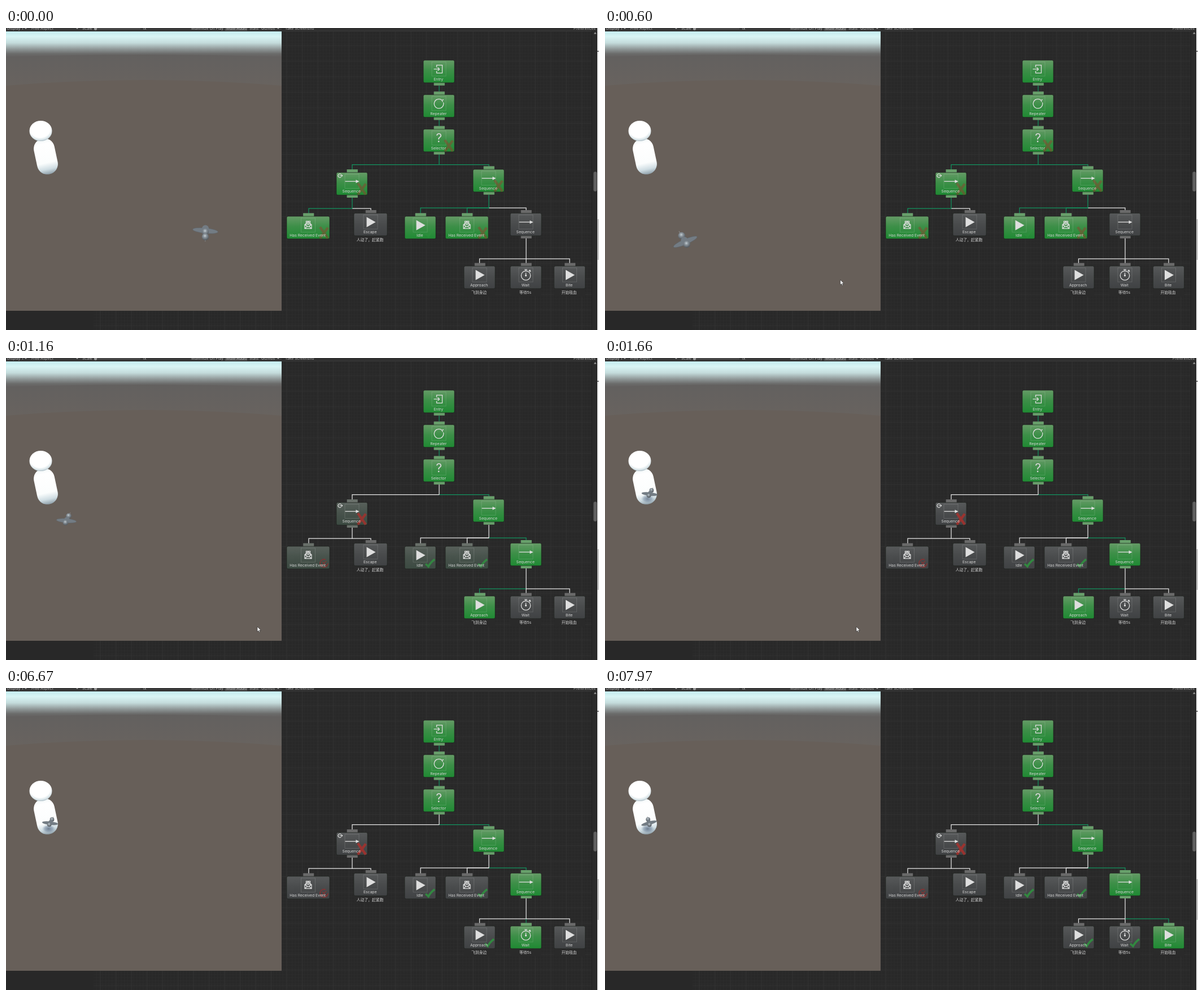
An HTML page that plays this animation: 1050 by 534 pixels, repeating every 8000 ms.

```html
<!DOCTYPE html>
<html lang="en">
<head>
<meta charset="utf-8">
<title>Behavior tree</title>
<style>
html, body { margin: 0; width: 100%; height: 100%; overflow: hidden; background: #282828; }
svg { display: block; width: 100vw; height: 100vh; }
text { font-family: Inter, "Noto Sans CJK SC", "Noto Sans CJK", sans-serif; font-size: 6.8px; fill: #d6d6d6; }
.mid { text-anchor: middle; }
.bar text { fill: #b4b4b4; }
</style>
</head>
<body>
<svg id="stage" viewBox="0 0 1050 534" preserveAspectRatio="none">
  <defs>
    <pattern id="minor" width="5.5" height="5.5" patternUnits="userSpaceOnUse">
      <path d="M0 .5H5.5M.5 0V5.5" stroke="#2d2d2d" stroke-width=".7"/>
    </pattern>
    <pattern id="major" x="2" y="3" width="27.5" height="27.5" patternUnits="userSpaceOnUse">
      <path d="M0 .5H27.5M.5 0V27.5" stroke="#343434" stroke-width=".8"/>
    </pattern>
    <linearGradient id="green" x2="0" y2="1">
      <stop stop-color="#659b66"/><stop offset=".45" stop-color="#3d8f48"/><stop offset="1" stop-color="#1f8a33"/>
    </linearGradient>
    <linearGradient id="gray" x2="0" y2="1">
      <stop stop-color="#57595a"/><stop offset=".5" stop-color="#494b4c"/><stop offset="1" stop-color="#404244"/>
    </linearGradient>
    <linearGradient id="sky" x2="0" y2="1">
      <stop stop-color="#c3ebee"/><stop offset=".2" stop-color="#d9f5f5"/><stop offset=".45" stop-color="#c4dcdc"/>
      <stop offset=".7" stop-color="#8f9797"/><stop offset=".88" stop-color="#6b6b6a"/><stop offset="1" stop-color="#646160"/>
    </linearGradient>
    <linearGradient id="haze" x2="0" y2="1">
      <stop stop-color="#62605f"/><stop offset="1" stop-color="#68635f"/>
    </linearGradient>
    <radialGradient id="head" cx=".47" cy=".36" r=".66">
      <stop offset=".7" stop-color="#fff"/><stop offset=".88" stop-color="#d8e4e8"/><stop offset="1" stop-color="#a3b3bc"/>
    </radialGradient>
    <linearGradient id="torso" x2="0" y2="1">
      <stop stop-color="#eef5f6"/><stop offset=".15" stop-color="#fff"/><stop offset=".68" stop-color="#fbfdfd"/>
      <stop offset=".86" stop-color="#cfdde3"/><stop offset="1" stop-color="#8fa0aa"/>
    </linearGradient>
    <radialGradient id="ball" cx=".45" cy=".35" r=".65">
      <stop stop-color="#c6d0d6"/><stop offset=".35" stop-color="#8d969d"/><stop offset="1" stop-color="#4f555b"/>
    </radialGradient>
    <radialGradient id="shade">
      <stop stop-color="#5d6d82" stop-opacity=".85"/><stop offset=".6" stop-color="#7d90a5" stop-opacity=".6"/><stop offset="1" stop-color="#a0b4c4" stop-opacity="0"/>
    </radialGradient>
    <clipPath id="view"><rect y="6" width="488" height="494"/></clipPath>
  </defs>

  <rect width="1050" height="534" fill="#282828"/>
  <g id="grid"></g>

  <g id="scene" clip-path="url(#view)">
    <rect y="6" width="488" height="494" fill="#675f59"/>
    <path d="M0 40H488V102Q244 82 0 102Z" fill="url(#haze)"/>
    <path d="M0 6H488V51Q244 43 0 51Z" fill="url(#sky)"/>
    <rect x="52" y="195" width="37" height="64" rx="18" fill="url(#torso)" transform="rotate(-12 70.5 227)"/>
    <ellipse cx="61.5" cy="182" rx="20" ry="18" fill="url(#head)"/>
    <ellipse id="shadow" cx="75.5" cy="249" rx="12" ry="8" fill="url(#shade)"/>
    <g id="fly"></g>
  </g>

  <g class="bar" id="bar">
    <rect width="1047" height="6" fill="#383838"/>
    <rect x="488" width="559" height="5" fill="#303030"/>
    <rect y="5.2" width="488" height=".8" fill="#252525"/>
    <rect x="388" width="39" height="5" fill="#525252"/>
    <path d="M161 1.5H238" stroke="#606060"/>
    <circle cx="158.5" cy="1.2" r="2.6" fill="#999"/>
    <path d="M33 0h4l-2 2zM124 0h4l-2 2zM480 0h4l-2 2z" fill="#aaa"/>
  </g>
  <g id="links" fill="none" stroke-width="1.25"></g>
  <g id="nodes"></g>

  <rect x="1038" y="5" width="9" height="529" fill="#2b2b2b"/>
  <path d="M1037.5 5V534" stroke="#242424"/>
  <path d="M1040.8 10.5l2.4-3.2 2.4 3.2z" fill="#999"/>
  <rect x="1040.3" y="254" width="6" height="35" rx="3" fill="#5f5f5f"/>
  <rect x="1047" width="3" height="534" fill="#f0f0f0"/>
  <rect x="1047" y="338" width="3" height="72" fill="#c8c8c8"/>
  <rect x="1047" y="40.5" width="2.5" height="1.5" fill="#444"/>
  <path id="cursor" d="M0 0V9L2.1 7.1 3.6 10.3 5 9.7 3.6 6.6H6.4Z" fill="#fff" stroke="#222" stroke-width=".6"/>
</svg>
<script>
const LOOP = 8000, FADE = 500;
const SEEN = 715, ARRIVED = 1695, BITE = 6690;
const GREEN = '#12935f', WHITE = '#e6e6e6';
const $ = id => document.getElementById(id);
const clamp = v => Math.max(0, Math.min(1, v));
const mix = (a, b, u) => a + (b - a) * u;

function add(parent, tag, attrs = {}, text) {
  const el = document.createElementNS('http://www.w3.org/2000/svg', tag);
  set(el, attrs);
  if (text) el.textContent = text;
  parent.appendChild(el);
  return el;
}
function set(el, attrs) {
  for (const k in attrs) el.setAttribute(k, attrs[k]);
}

for (const id of ['minor', 'major']) {
  add($('grid'), 'path', { d: 'M488 5H1038V534H155V500H488Z', fill: `url(#${id})` });
}

[[2, 'Display 1'], [45, 'Free Aspect'], [135, 'Scale'], [242, '1x'], [328, 'Maximize On Play'],
 [390, 'Mute Audio'], [431, 'Stats'], [452, 'Gizmos'], [494, 'Take Screensho'], [1005, 'Preferences']]
  .forEach(([x, s]) => add($('bar'), 'text', { x, y: 3 }, s));

// Icons are drawn around the centre of the icon frame.
const icons = {
  entry: 'M-4-3V-7H6V7H-4V3M-9 0H1M-2-3L1 0-2 3',
  repeat: 'M5.5-6A8.3 8.3 0 1 0 8 -2M8.4-7L5.5-6 6.6-2.8',
  arrow: 'M-12 0H10',
  mail: 'M-6-1L0-6 6-1V6H-6ZM-6-1L0 3 6-1M-6 6L-1.5 2M6 6L1.5 2M-3.5 0V-7H3.5V0M-2-5H2M-2-3H2M-2-1H2',
  timer: 'M-8.2 1A8.2 8.2 0 1 0 8.2 1A8.2 8.2 0 1 0 -8.2 1M0 1V-4M-2.5-9.5H2.5M0-9.5V-7M6-7.5L8-5.5'
};
const fills = {
  arrow: 'M7-3L13 0 7 3Z',
  play: 'M-7-9L9 0-7 9Z',
  timer: 'M-1.6 1A1.6 1.6 0 1 0 1.6 1A1.6 1.6 0 1 0 -1.6 1M4.5-8l3-1.5 1.8 3.5z'
};
const marks = {
  cross: { d: 'M-7-10L7 10M7-9L-7 10', stroke: '#a8302b', 'stroke-width': 4.6 },
  check: { d: 'M-8 1L-3 5.5Q1-2 8-7', stroke: '#2f9440', 'stroke-width': 3.6 },
  abort: { d: 'M7 0A7 7 0 1 1 3-6.5M-4 4L4-4M-3-3L4 4', stroke: '#8d3030', 'stroke-width': 1.7 }
};

// x, y, width, label, icon, [from, to], marks [[kind, from, to]], tabs (1 top, 2 bottom), note
const always = [-1e4, 1e5], early = [-1e4, SEEN];
const specs = [
  [739, 57, 55, 'Entry', 'entry', always, [], 2],
  [739, 118, 55, 'Repeater', 'repeat', always, [], 3],
  [739, 179, 55, 'Selector', 'ask', always, [['cross', ...early]], 3],
  [585, 255.5, 55, 'Sequence', 'arrow', early, [['cross', ...always]], 3],
  [827, 250, 55, 'Sequence', 'arrow', always, [['cross', ...early]], 3],
  [497, 333, 76, 'Has Received Event', 'mail', early, [['cross', ...early], ['abort', SEEN, 1e5]], 1],
  [616, 327.5, 59, 'Escape', 'play', null, [], 1, '人动了，赶紧跑'],
  [706, 333, 55, 'Idle', 'play', early, [['check', ...always]], 1],
  [778, 333, 76, 'Has Received Event', 'mail', early, [['cross', ...early], ['check', SEEN, 1e5]], 1],
  [893, 327.5, 55, 'Sequence', 'arrow', [SEEN, 1e5], [], 3],
  [811, 421, 55, 'Approach', 'play', [SEEN, ARRIVED], [['check', ARRIVED, 1e5]], 1, '飞到身边'],
  [893, 421, 55, 'Wait', 'timer', [ARRIVED, BITE], [['check', BITE, 1e5]], 1, '等待5s'],
  [970.5, 421, 55, 'Bite', 'play', [BITE, 1e5], [], 1, '开始吸血']
];

function makeNode([x, y, w, label, icon, span, flags, tabs, note]) {
  const g = add($('nodes'), 'g', { transform: `translate(${x} ${y})` });
  const c = w / 2;
  const skin = (fill, tab) => {
    const s = add(g, 'g');
    if (tabs & 1) add(s, 'rect', { x: c - 8.8, y: -5.5, width: 19, height: 6, fill: tab });
    if (tabs & 2) add(s, 'rect', { x: c - 8.8, y: 39.5, width: 19, height: 5, fill: tab });
    add(s, 'rect', { width: w, height: 39.8, rx: 2.5, fill, stroke: '#1d221e', 'stroke-width': .6 });
    return s;
  };
  skin('url(#gray)', '#6a6a6a');
  const lit = skin('url(#green)', '#68a06b');
  add(g, 'rect', { x: c - 12.5, y: 3, width: 25, height: 25, fill: 'none', stroke: '#fff', 'stroke-opacity': .2, 'stroke-width': .7 });
  const pic = add(g, 'g', { transform: `translate(${c} 15.7)` });
  if (icons[icon]) add(pic, 'path', { d: icons[icon], fill: 'none', stroke: '#dedede', 'stroke-width': 1.3 });
  if (fills[icon]) add(pic, 'path', { d: fills[icon], fill: '#dedede' });
  if (icon === 'ask') add(pic, 'text', { class: 'mid', y: 7.5, style: 'font-size:21px' }, '?');
  const signs = flags.map(([kind, from, to]) => ({
    from, to,
    el: add(g, 'path', { ...marks[kind], fill: 'none', transform: `translate(${w - 10} ${kind === 'cross' ? 29 : 30})` })
  }));
  add(g, 'text', { class: 'mid', x: c - .8, y: 35.5 }, label);
  if (note) {
    add(g, 'rect', { y: 40.5, width: w, height: 13, fill: '#2a2a2a' });
    add(g, 'text', { class: 'mid', x: c - 1, y: 49.3 }, note);
  }
  return { lit, span, signs };
}
const nodes = specs.map(makeNode);
add($('nodes'), 'path', { d: 'M593.5 258.8A3.2 3.2 0 1 0 593.5 263.4M590.5 261H595.5M593.8 259.3L595.8 261 593.8 262.7', fill: 'none', stroke: '#e0e0e0', 'stroke-width': 1.1 });

// Connector path with the spans in which it is lit
const links = [
  ['M767 102V112', always], ['M767 162V173', always],
  ['M767 241.5H613V250', early], ['M767 241.5H855V245', always], ['M767 223V242', early],
  ['M613 319H536V328', early], ['M613 319H646V322', null], ['M613 300V319.5', early],
  ['M855 318H921V322', [SEEN, 1e5]], ['M855 318H734V328', early], ['M855 318H816.5V328', early], ['M855 295V318.5', early],
  ['M921 408H838.5V416', [SEEN, ARRIVED]], ['M921 408V416', [ARRIVED, BITE]], ['M921 408H998V416', [BITE, 1e5]], ['M921 372V408.5', null]
].map(([d, span]) => ({ span, el: add($('links'), 'path', { d }) }));

const within = (t, span) => !!span && t >= span[0] && t < span[1];
function glow(t, span) {
  if (!span || t < span[0]) return 0;
  return t < span[1] ? 1 : clamp(1 - (t - span[1]) / FADE);
}

function drawTree(t) {
  for (const n of nodes) {
    const g = glow(t, n.span);
    n.lit.setAttribute('opacity', g);
    for (const s of n.signs) {
      s.el.setAttribute('opacity', within(t, [s.from, s.to]) ? mix(.85, .4, g) : 0);
    }
  }
  for (const l of links) l.el.setAttribute('stroke', within(t, l.span) ? GREEN : WHITE);
}

const fly = $('fly');
const sting = add(fly, 'path', { stroke: '#8b8d8f' });
const wings = add(fly, 'ellipse', { fill: '#737c84', stroke: '#5b636a', 'stroke-width': .5 });
const head = add(fly, 'circle', { fill: 'url(#ball)' });
const trunk = add(fly, 'path', { stroke: '#737c84', 'stroke-linecap': 'round' });
const front = add(fly, 'circle', { fill: 'url(#ball)' });
const rad = Math.PI / 180;

// Circles on an ellipse, then glides to the figure, then rocks while biting.
function flyPose(t) {
  const deg = .27 * Math.min(t, SEEN), a = deg * rad;
  const x = 245 + 108 * Math.cos(a), y = 358 + 66 * Math.sin(a);
  if (t < SEEN) return { x, y, deg, size: 1 + .08 * Math.sin(a) };
  const u = 1 - Math.pow(1 - clamp((t - SEEN) / (ARRIVED - SEEN)), 1.25);
  const rock = t > BITE ? 12 * (1 - Math.cos((t - BITE) / 1280 * 5 * Math.PI)) : 0;
  return { x: mix(x, 78, u), y: mix(y, 239, u), deg: mix(deg, 196, u) - rock, size: mix(.98, .62, u) };
}

function drawFly(t) {
  const { x, y, deg, size } = flyPose(t);
  const a = deg * rad, b = (6 + .92 * deg) * rad;
  const fx = -20.5 * Math.sin(a), fy = 11 * Math.cos(a);
  const wx = 22.5 * Math.cos(b), wy = 21 * Math.sin(b);
  const at = k => `${fx * k} ${fy * k}`;
  fly.setAttribute('transform', `translate(${x} ${y}) scale(${size})`);
  set(sting, { d: `M${at(1)}L${at(1.75)}` });
  set(wings, { rx: Math.hypot(wx, wy), ry: 4.6, transform: `rotate(${Math.atan2(wy, wx) / rad})` });
  set(trunk, { d: `M${at(-.35)}L${at(.25)}`, 'stroke-width': 12 });
  const tail = fy < 0 ? -.4 : .2;
  set(front, { cx: fx * tail, cy: fy * tail, r: 6 });
  set(head, { cx: fx, cy: fy, r: 6.2 });
  // The head is in front when the fly faces the camera.
  fly.insertBefore(head, fy < 0 ? trunk : null);
  $('shadow').setAttribute('opacity', clamp((t - 1400) / 290));
}

const track = [[30, 470, 509], [260, 457, 466], [600, 416.5, 445], [800, 445, 475], [1690, 445, 475], [1950, 452, 540]];
function drawCursor(t) {
  const i = track.findIndex((p, k) => k && t < p[0]);
  const shown = t >= 30 && i > 0;
  $('cursor').setAttribute('visibility', shown ? 'visible' : 'hidden');
  if (!shown) return;
  const [t0, x0, y0] = track[i - 1], [t1, x1, y1] = track[i];
  const u = (t - t0) / (t1 - t0);
  $('cursor').setAttribute('transform', `translate(${mix(x0, x1, u)} ${mix(y0, y1, u)})`);
}

function frame() {
  const t = performance.now() % LOOP;
  drawTree(t);
  drawFly(t);
  drawCursor(t);
  requestAnimationFrame(frame);
}
frame();
</script>
</body>
</html>
```
